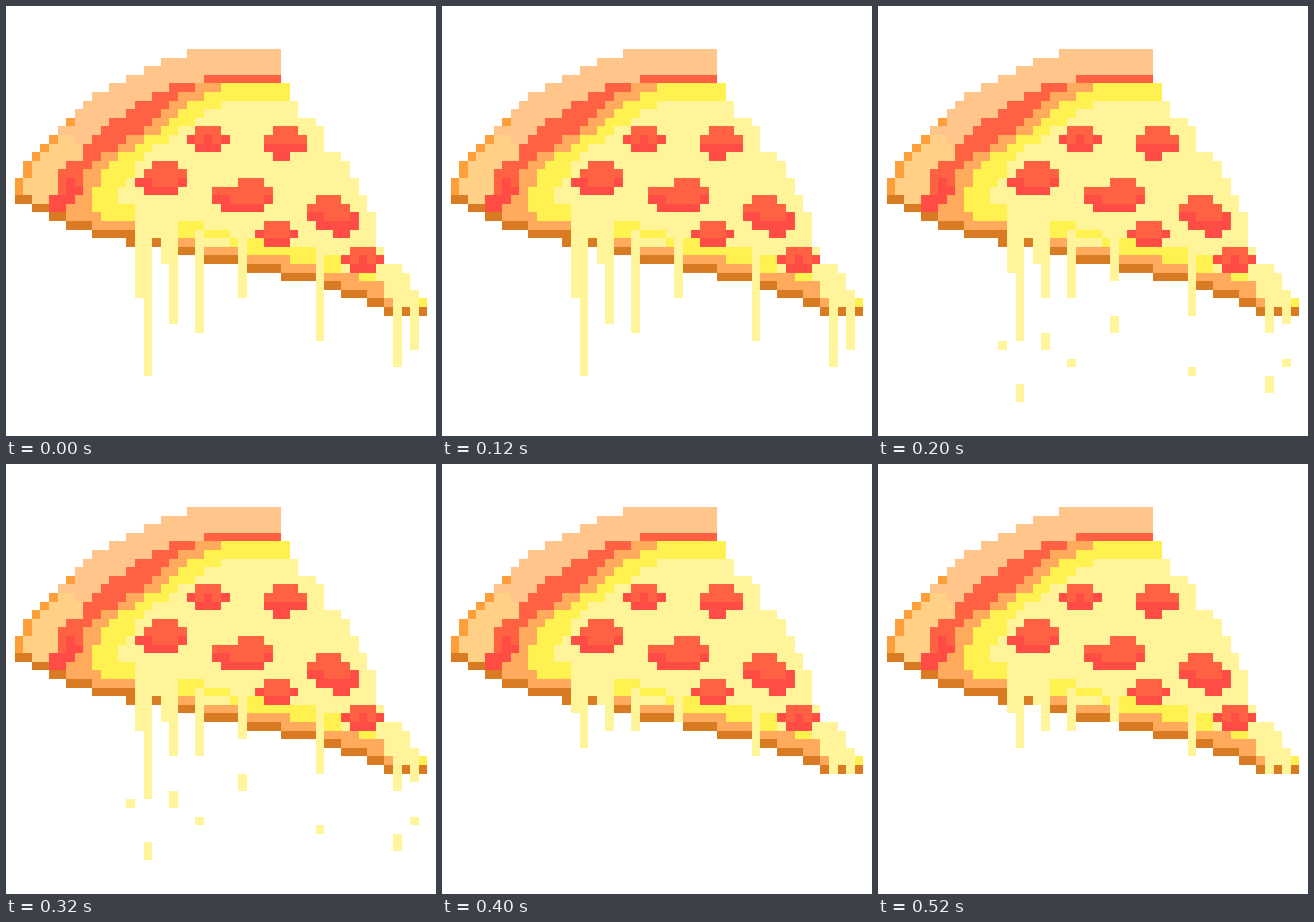
These frames come from a looping animation (480 by 480 pixels, 600 ms). An HTML page:

```html
<!DOCTYPE html>
<html lang="en">
<head>
<meta charset="utf-8">
<title>Dripping pizza</title>
<style>
  html, body { margin: 0; height: 100%; overflow: hidden; background: #fff; }
  svg { display: block; width: 100%; height: 100%; }
</style>
</head>
<body>
<!-- One unit is one cell of the 50 by 50 pixel grid -->
<svg viewBox="0 0 50 50" shape-rendering="crispEdges">
  <!-- underside -->
  <path fill="#d97b22" d="M1 22V23H3V24H5V25H7V26H10V27H14V28H18V27H20V29H23V30H28V31H32V32H37V33H39V34H42V35H44V36H49V34H42V31H32V28H20V25H10V23H5V22Z"/>
  <!-- dough -->
  <path fill="#ffaa5c" d="M19 9H32V20H40V28H44V34H45V35H44V34H42V33H39V32H37V31H32V30H28V29H23V28H20V26H10V25H7V18H9V15H12V12H16V9Z"/>
  <!-- crust, its lower part and its edge -->
  <path fill="#ffc58b" d="M21 5H32V8H23V9H19V10H17V11H15V12H14V13H12V14H11V15H10V16H9V18H7V19H6V22H5V23H3V22H1V20H2V18H3V17H4V16H5V15H6V14H7V13H8V12H9V11H10V10H12V9H14V8H16V7H18V6H21Z"/>
  <path fill="#ffd085" d="M6 15H8V16H9V18H7V19H6V22H5V23H3V22H2V20H3V18H4V17H5V16H6Z"/>
  <path fill="#ff9f3b" d="M7 13h1v1h-1zM5 15h1v1h-1zM4 16h1v1h-1zM3 17h1v1h-1zM2 18h1v2h-1zM1 20h1v2h-1z"/>
  <!-- sauce -->
  <path fill="#ff6242" d="M23 8H32V9H22V10H20V11H19V12H18V13H17V14H16V15H14V16H13V17H11V18H10V19H9V22H8V23H7V24H5V22H6V19H7V18H9V16H10V15H11V14H12V13H14V12H15V11H17V10H19V9H23Z"/>
  <path fill="#ff4d45" d="M7 20H8V21H9V22H8V23H7V24H5V22H7Z"/>
  <!-- cheese -->
  <path fill="#fff14f" d="M25 9H33V11H25V12H23V13H22V14H20V15H19V16H17V17H16V18H15V20H14V21H13V23H15V25H11V24H10V21H11V19H12V18H13V17H15V16H16V15H18V14H19V13H20V12H21V11H23V10H25Z"/>
  <path fill="#fff499" d="M25 11H34V13H36V14H37V17H39V18H40V20H41V22H42V24H43V28H44V30H46V31H47V33H48V35H45V34H44V32H43V31H39V29H36V28H23V26H20V27H15V23H13V21H14V20H15V18H16V17H17V16H19V15H20V14H22V13H23V12H25Z"/>
  <path fill="#fff14f" d="M20 25h3v1h3v1h-6zM26 27h1v1h-1zM28 27h2v1h6v2h-3v-1h-5zM37 29h2v2h-2zM41 31h2v1h-2zM48 34h1v1h-1z"/>
  <path fill="#ffaa5c" d="M39 31h2v1h-2z"/>
  <path id="drips" fill="#fff499"/>
  <!-- pepperoni, then its shade -->
  <path fill="#ff6242" d="M22 14h3v1h1v1h-1v1h-3v-1h-1v-1h1zM31 14h3v1h1v2h-2v1h-2v-1h-1v-2h1zM17 18h3v1h1v2h-1v1h-4v-1h-1v-1h1v-1h1zM27 20h3v1h1v2h-1v1h-5v-1h-1v-2h3zM36 22h3v1h1v1h1v2h-1v1h-2v-1h-2v-1h-1v-2h1zM30 25h3v1h1v1h-1v1h-3v-1h-1v-1h1zM40 28h3v1h1v1h-1v1h-3v-1h-1v-1h1z"/>
  <path fill="#ff4d45" d="M21 15h1v1h3v-1h1v1h-1v1h-3v-1h-1zM23 15h1v1h-1zM30 16h5v1h-2v1h-2v-1h-1zM15 20h2v1h3v-1h1v1h-1v1h-4v-1h-1zM24 22h2v1h4v-1h1v1h-1v1h-5v-1h-1zM35 24h2v1h3v-1h1v2h-1v1h-2v-1h-2v-1h-1zM29 26h1v1h4v-1h-1v1v1h-3v-1h-1zM39 29h1v1h3v-1h1v1h-1v1h-3v-1h-1zM41 29h1v1h-1z"/>
</svg>
<script>
  const STEP = 200;
  // column, top, then the lower end at each step
  const strands = [
    [15, 24, 34, 31, 29], [16, 24, 43, 39, 33], [18, 24, 30, 30, 28],
    [19, 24, 37, 34, 31], [22, 26, 38, 34, 31], [27, 26, 34, 32, 30],
    [36, 28, 39, 36, 34], [45, 34, 42, 38, 36], [47, 34, 40, 37, 36]
  ];
  // column, top, length of the drops that break off in the middle step
  const drops = [
    [14, 39, 1], [16, 44, 2], [19, 38, 2], [22, 41, 1],
    [27, 36, 2], [36, 42, 1], [45, 43, 2], [47, 41, 1]
  ];
  const drips = document.getElementById("drips");
  const column = (x, y, h) => `M${x} ${y}h1v${h}h-1z`;

  function draw(now) {
    const step = Math.floor(now / STEP) % 3;
    const parts = strands.map(([x, top, ...ends]) => column(x, top, ends[step] - top));
    if (step === 1) parts.push(...drops.map(d => column(...d)));
    drips.setAttribute("d", parts.join(""));
    requestAnimationFrame(draw);
  }
  draw(performance.now());
</script>
</body>
</html>
```
